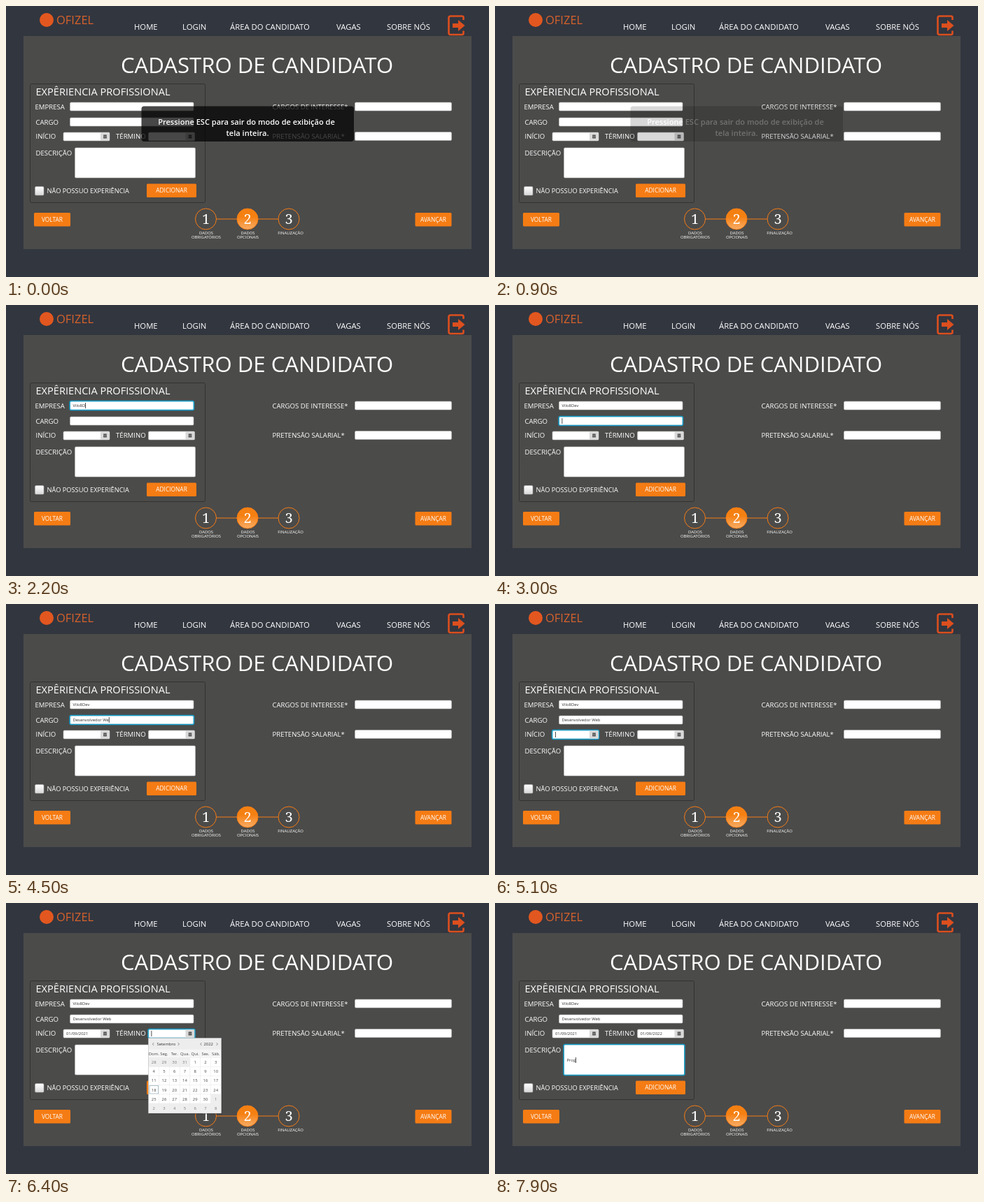
Animation of 690x388 px, one loop 8000 ms. Source, as an HTML page:

```html
<!DOCTYPE html>
<html lang="pt-BR">
<head>
<meta charset="utf-8">
<title>Cadastro de candidato</title>
<style>
  html, body { margin: 0; width: 100%; height: 100%; overflow: hidden; background: #32363f; }
  svg { display: block; width: 100vw; height: 100vh; }
  text { font-family: "Open Sans", "Noto Sans", sans-serif; fill: #fff; white-space: pre; }
  .menu { font-size: 11.3px; }
  .label { font-size: 9.6px; }
  .button { font-size: 8.4px; text-anchor: middle; }
  .digit { font: 20px "Noto Serif", serif; text-anchor: middle; }
  .caption { font-size: 5.9px; text-anchor: middle; }
  .notice { font-size: 11.05px; font-weight: 600; text-anchor: middle; }
  .value { font-size: 5.9px; fill: #333; }
  .day { font-size: 5.9px; fill: #444; text-anchor: middle; }
</style>
</head>
<body>
<svg id="stage" viewBox="0 0 690 388">
  <defs>
    <linearGradient id="active" x2="0" y2="1">
      <stop offset=".4" stop-color="#f58012"/><stop offset="1" stop-color="#f8ad68"/>
    </linearGradient>
    <linearGradient id="soft" x2="0" y2="1">
      <stop stop-color="#fff"/><stop offset="1" stop-color="#d8d8d8"/>
    </linearGradient>
  </defs>
</svg>
<script>
const LOOP = 8000, ORANGE = '#f57c14', BLUE = '#16a0cc';
const stage = document.getElementById('stage');

function add(parent, tag, attrs, content = '') {
  const node = document.createElementNS('http://www.w3.org/2000/svg', tag);
  for (const key in attrs) node.setAttribute(key, attrs[key]);
  node.textContent = content;
  return parent.appendChild(node);
}
const box = (x, y, width, height, fill, more = {}, parent = stage) =>
  add(parent, 'rect', { x, y, width, height, fill, ...more });
const write = (x, y, content, cls, more = {}, parent = stage) =>
  add(parent, 'text', { x, y, class: cls, ...more }, content);
const path = (d, stroke, width, more = {}, parent = stage) =>
  add(parent, 'path', { d, stroke, 'stroke-width': width, fill: 'none', ...more });
const show = (node, visible) => node.setAttribute('visibility', visible ? 'visible' : 'hidden');

// Header
box(0, 0, 690, 388, '#32363f');
box(25, 43, 640, 305, '#4b4b4a');
add(stage, 'circle', { cx: 58, cy: 20, r: 10, fill: '#e2571f' });
write(72, 26, 'OFIZEL', '', { style: 'font-size:16.5px;fill:#d9622b' });
[[183, 'HOME'], [252, 'LOGIN'], [320, 'ÁREA DO CANDIDATO'], [472, 'VAGAS'], [544, 'SOBRE NÓS']]
  .forEach(([x, name]) => write(x, 34, name, 'menu'));
path('M653.500 20V16.500Q653.500 14.500 651.500 14.500H635Q632.500 14.500 632.500 17V38.500Q632.500 41 635 41H651.500Q653.500 41 653.500 39V35.500', '#dc4f1e', 2.6);
add(stage, 'path', { d: 'M638 25H646V20L655.500 28L646 36V31H638Z', fill: '#dc4f1e' });
write(358.5, 95.5, 'CADASTRO DE CANDIDATO', '', { style: 'font-size:31.1px;text-anchor:middle' });

// Form
box(34.5, 111.5, 250, 170, 'none', { stroke: '#323232', rx: 2 });
write(42.5, 128, 'EXPÊRIENCIA PROFISSIONAL', '', { style: 'font-size:14.6px' });
[[41.5, 147.5, 'EMPRESA'], [42.5, 169.5, 'CARGO'], [42.5, 190, 'INÍCIO'], [157, 190, 'TÉRMINO'],
 [42.5, 213.5, 'DESCRIÇÃO'], [380.5, 147.5, 'CARGOS DE INTERESSE*'], [380.5, 190, 'PRETENSÃO SALARIAL*']]
  .forEach(([x, y, name]) => write(x, y, name, 'label'));
write(58.5, 268, 'NÃO POSSUO EXPERIÊNCIA', '', { style: 'font-size:9.25px' });
box(41.5, 258.5, 12.5, 12.5, 'url(#soft)', { rx: 1.5, stroke: '#aaa', 'stroke-width': .6 });

function button(x, y, width, name) {
  box(x, y, width, 19.5, ORANGE, { rx: 1.5 });
  write(x + width / 2, y + 12.7, name, 'button');
}
button(201, 254.5, 71, 'ADICIONAR');
button(40, 296, 52, 'VOLTAR');
button(584.5, 296, 52, 'AVANÇAR');

// Progress steps
path('M300 305H330M360 305H389', ORANGE, 1);
[[285.5, ['DADOS', 'OBRIGATÓRIOS']], [345, ['DADOS', 'OPCIONAIS']], [404, ['FINALIZAÇÃO']]]
  .forEach(([cx, lines], i) => {
    add(stage, 'circle', { cx, cy: 305, r: 15, stroke: ORANGE, fill: i === 1 ? 'url(#active)' : 'none' });
    write(cx, 312.3, i + 1, 'digit');
    lines.forEach((line, row) => write(cx + (i === 2 ? 2.5 : .5), 326.5 + row * 6, line, 'caption'));
  });

function field(x, y, width, height, textY = y + height / 2 + 2) {
  box(x, y, width, height, '#fff', { rx: 1.5, stroke: '#b5b5b5', 'stroke-width': .6 });
  const ring = add(stage, 'g', {});
  box(x - .4, y - .4, width + .8, height + .8, 'none', { rx: 2, stroke: BLUE, 'stroke-width': 1.5 }, ring);
  const text = write(x + 4, textY, '', 'value');
  const caret = box(0, textY - 6, .8, 8, '#222');
  return (value, focused, caretOn = focused) => {
    text.textContent = value;
    show(ring, focused);
    show(caret, caretOn);
    caret.setAttribute('x', x + 4 + (value ? text.getComputedTextLength() : 0));
  };
}

function dateField(x) {
  const update = field(x, 181, 66, 12);
  box(x + 53, 181.3, 12.7, 11.4, '#d9d9d9');
  box(x + 57.2, 184.5, 4.6, 5, '#444');
  path(`M${x + 57.2} 186.300h4.600M${x + 58} 188h3`, '#d9d9d9', .5);
  return update;
}

const company = field(91.5, 138, 176.5, 12);
const role = field(91.5, 160, 176.5, 12);
const start = dateField(82);
const end = dateField(203.5);
const description = field(98.5, 203, 172, 43, 227);
field(498.5, 138, 138, 12)('', false);
field(498.5, 180.5, 138, 12)('', false);

function calendar(x, year, { selectable = true, yearFocus = false } = {}) {
  const group = add(stage, 'g', {});
  const cell = 14.75, rowHeight = 13.1, top = 221.5;
  box(x + 1, 195, 104, 107.5, '#000', { opacity: .25 }, group);
  box(x, 193.5, 104, 107.5, '#fff', { stroke: '#aaa', 'stroke-width': .6 }, group);
  box(x + .3, 193.8, 103.4, 16, '#ededed', {}, group);
  box(x + .3, 209.8, 103.4, 11.7, '#f5f5f5', {}, group);
  if (yearFocus) box(x + 72, 197, 5.5, 9.5, '#e4f3f8', { stroke: BLUE, 'stroke-width': .8 }, group);
  [[6.8, -1], [43, 1], [75, -1], [98, 1]].forEach(([dx, dir]) =>
    path(`M${x + dx - dir} 200l${dir * 2} 2l${-dir * 2} 2`, '#666', .7, {}, group));
  write(x + 12, 204, 'Setembro', 'value', {}, group);
  write(x + 79, 204, year, 'value', {}, group);
  'Dom. Seg. Ter. Qua. Qui. Sex. Sáb.'.split(' ').forEach((name, i) =>
    write(x + 7.75 + i * cell, 218, name, 'day', {}, group));

  const offset = new Date(year, 8, 1).getDay();
  let marker, markerText;
  for (let i = 0; i < 42; i++) {
    const date = new Date(year, 8, 1 - offset + i);
    const inMonth = date.getMonth() === 8, day = date.getDate();
    const cx = x + .5 + (i % 7) * cell, cy = top + Math.floor(i / 7) * rowHeight;
    box(cx, cy, cell - .2, rowHeight, inMonth ? '#fff' : '#eee', { stroke: '#e8e8e8', 'stroke-width': .4 }, group);
    if (inMonth && day === 18 && year === 2022)
      box(cx + 1, cy + .8, 12.6, 11.4, 'none', { stroke: '#9bb5c0', 'stroke-width': .8 }, group);
    if (inMonth && day === 1) marker = box(cx, cy, 14, rowHeight, '#0c9ac4', {}, group);
    const label = write(cx + 7.2, cy + 8.7, day, 'day', inMonth ? {} : { style: 'fill:#777' }, group);
    if (inMonth && day === 1) markerText = label;
  }
  return (open, chosen) => {
    group.style.display = open ? '' : 'none';
    marker.style.display = chosen ? '' : 'none';
    markerText.style.fill = chosen ? '#fff' : '';
  };
}
const startThisYear = calendar(82, 2022);
const startLastYear = calendar(82, 2021, { yearFocus: true });
const endCalendar = calendar(203.5, 2022);

// Full-screen notice
const notice = add(stage, 'g', {});
box(193.5, 143.5, 303.5, 50.5, '#000', { rx: 4, opacity: .72 }, notice);
write(343.5, 170, 'Pressione ESC para sair do modo de exibição de', 'notice', {}, notice);
write(345, 185.5, 'tela inteira.', 'notice', {}, notice);

const typed = (word, t, from, step) =>
  word.slice(0, Math.max(0, Math.floor((t - from) / step) + 1));

function render(t) {
  const within = (from, to) => t >= from && t < to;
  notice.setAttribute('opacity', Math.min(1, Math.max(0, (1050 - t) / 700)));
  company(typed('Vilo8Dev', t, 1400, 140), within(1000, 2800));
  role(typed('Desenvolvedor Web', t, 3100, 92), within(2800, 5000));
  start(t >= 6100 ? '01/09/2021' : '', within(5000, 6200), within(5000, 5200));
  end(t >= 6800 ? '01/09/2022' : '', within(6200, 6900));
  description(t < 7800 ? typed('Pr', t, 7300, 200) : typed('Prog', t, 7600, 100), t >= 6900);
  startThisYear(within(5200, 5700), false);
  startLastYear(within(5700, 6100), t >= 5900);
  endCalendar(within(6300, 6800), t >= 6700);
}

const origin = performance.now();
function tick() {
  render((performance.now() - origin) % LOOP);
  requestAnimationFrame(tick);
}
tick();
</script>
</body>
</html>
```
